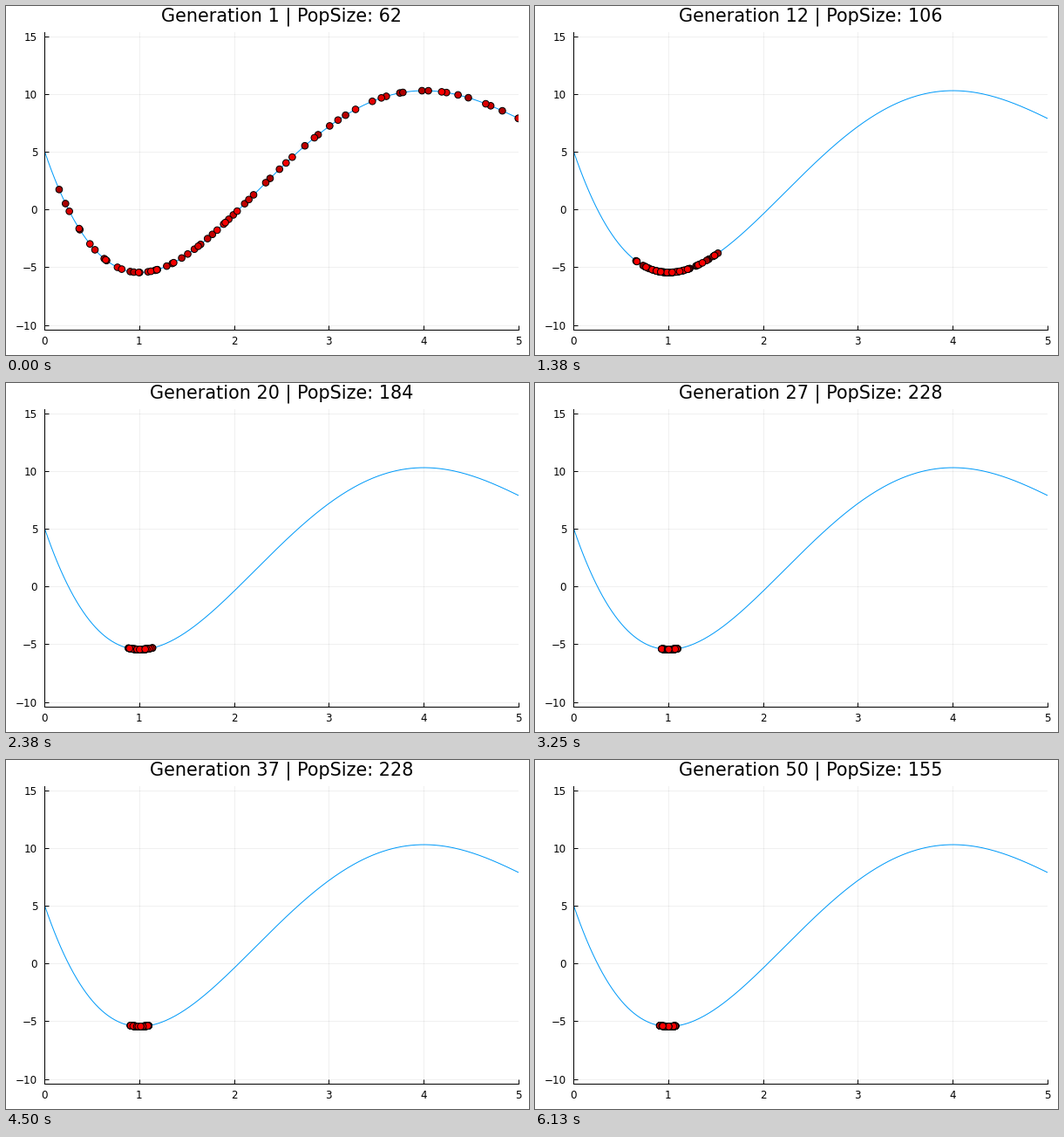
Animation of 600x400 px, one loop 6.26 s. Source, as a matplotlib script:

```python
import numpy as np
import matplotlib.pyplot as plt
from matplotlib.animation import FuncAnimation
from matplotlib.transforms import Affine2D

WIDTH, HEIGHT, DPI = 600, 400, 100
GENERATIONS, LOOP_MS, TICK_MS, GENERATION_MS = 50, 6260, 20, 125
PX = 72 / DPI  # points per pixel
LEFT, RIGHT, TOP, BOTTOM = 44.15, 587.75, 29.9, 370.95

# How the population's size and extent develop over the generations
KEY_GENS = [1, 7, 12, 20, 27, 37, 50]
SIZES = [62, 78, 106, 184, 228, 228, 155]
LOWS = [.15, .62, .655, .88, .925, .90, .905]
HIGHS = [5, 2.22, 1.52, 1.135, 1.095, 1.095, 1.075]

plt.rcParams["font.family"] = "DejaVu Sans"
rng = np.random.default_rng(4)


def fitness(x):
    return x**4 / 4 - 11 * x**3 / 3 + 17 * x**2 - 24 * x + 5


def at_generation(gen, values):
    return np.interp(gen, KEY_GENS, values)


def offspring(gen):
    """Columns of position, birth and death; positions crowd the optimum."""
    size = at_generation(gen, SIZES)
    count = round(size if gen == 1 else size / 4)
    u = 2 * (np.arange(count) + rng.uniform(0, 1, count)) / count - 1
    peak = 1 + 1 / gen**3
    edge = np.where(u < 0, at_generation(gen, LOWS), at_generation(gen, HIGHS))
    x = peak + (edge - peak) * np.abs(u) ** (3 - 1.8 / gen)
    birth = gen - rng.uniform(0, 2.3 / gen, count)
    death = gen + rng.uniform(1, 7, count)
    return np.column_stack([x, birth, death])


INDIVIDUALS = np.vstack([offspring(g) for g in range(1, GENERATIONS + 1)])


def population(gen):
    """Positions and ages of the living, oldest first."""
    x, birth, death = INDIVIDUALS.T
    low, high = at_generation(gen, LOWS), at_generation(gen, HIGHS)
    alive = (birth <= gen) & (gen < death) & (low <= x) & (x <= high)
    alive &= np.ceil(birth) <= gen
    x = np.append(x[alive], [low, high])
    age = np.append(gen - birth[alive], [2, 2])
    order = np.argsort(-age)
    return x[order], age[order]


fig = plt.figure(figsize=(WIDTH / DPI, HEIGHT / DPI), dpi=DPI, facecolor="white")
ax = fig.add_axes([LEFT / WIDTH, 1 - BOTTOM / HEIGHT,
                   (RIGHT - LEFT) / WIDTH, (BOTTOM - TOP) / HEIGHT])
ax.set(xlim=(0, 5), ylim=(-10.41, 15.37),
       xticks=range(6), yticks=range(-10, 16, 5))
ax.set_axisbelow(True)
ax.grid(color="black", alpha=.06, linewidth=PX)
ax.spines[["top", "right"]].set_visible(False)
ax.spines[["left", "bottom"]].set_linewidth(PX)
ax.tick_params(direction="in", length=5 * PX, width=PX, labelsize=11.9 * PX)
ax.tick_params(axis="x", pad=7.3 * PX)
ax.tick_params(axis="y", pad=8 * PX)

# Straight lines snap to pixels; the curve and dots sit at pixel centres.
centred = ax.transData + Affine2D().translate(.5, -.5)
curve_x = np.linspace(0, 5, 300)
ax.plot(curve_x, fitness(curve_x), color="#009af9", linewidth=PX,
        transform=centred)
markers = ax.scatter([], [], s=(7.6 * PX) ** 2, edgecolors="black",
                     linewidths=PX, zorder=2.2, transform=centred)
ax.set(xlim=(0, 5), ylim=(-10.41, 15.37))
title = fig.text(((LEFT + RIGHT) / 2 + .5) / WIDTH, 1 - 17.4 / HEIGHT, "",
                 fontsize=20.8 * PX, ha="center", va="baseline")


def update(frame):
    elapsed = frame * TICK_MS + TICK_MS / 2
    gen = min(1 + int(elapsed // GENERATION_MS), GENERATIONS)
    x, age = population(gen)
    red = np.clip(1 - age / 6, .1, 1)
    markers.set_offsets(np.column_stack([x, fitness(x)]))
    markers.set_facecolors(np.column_stack([red, 0 * red, 0 * red]))
    size = round(at_generation(gen, SIZES))
    title.set_text(f"Generation {gen} | PopSize: {size}")
    return markers, title


animation = FuncAnimation(fig, update, frames=LOOP_MS // TICK_MS,
                          interval=TICK_MS, repeat=True, repeat_delay=0)
plt.show()
```
